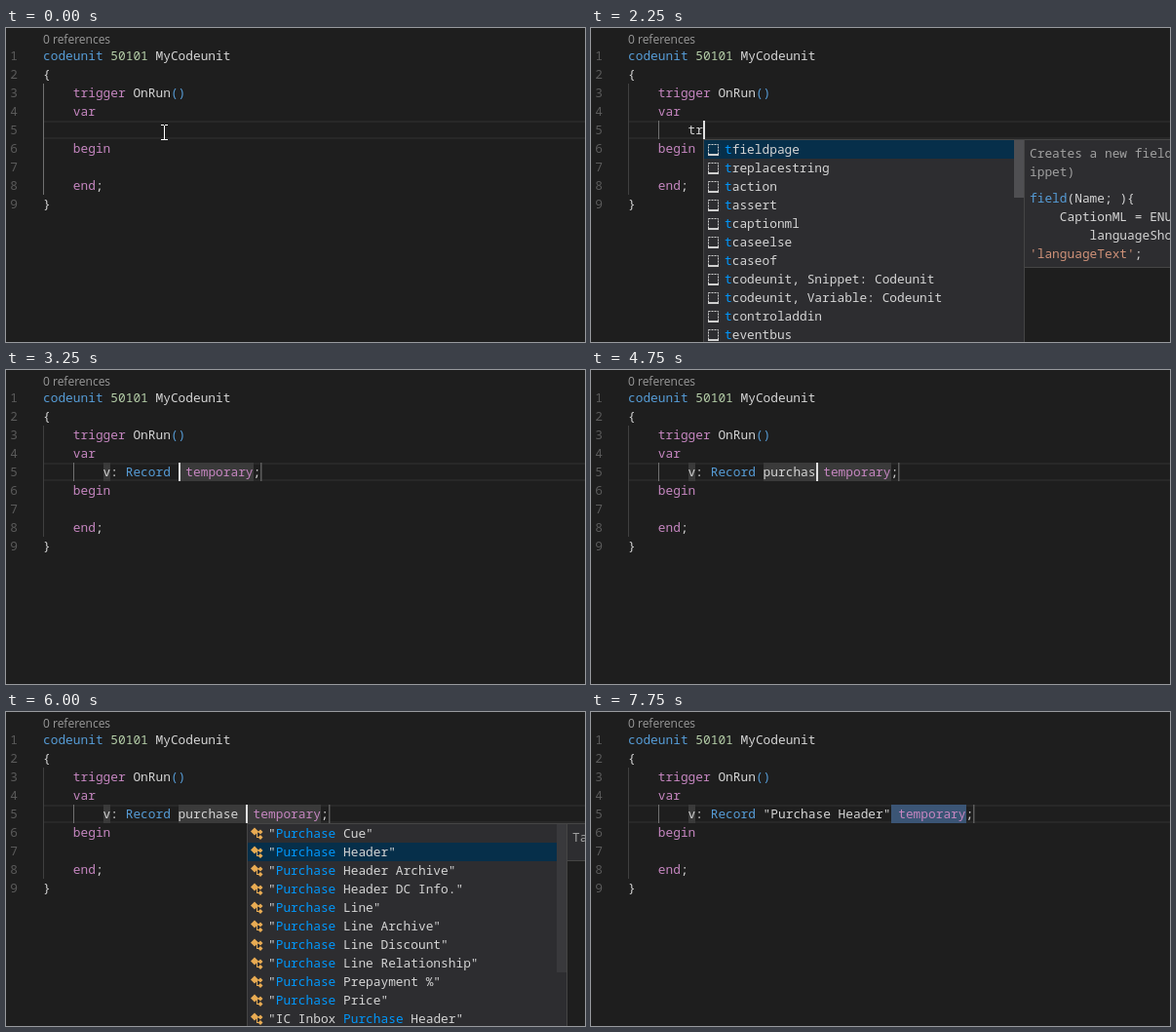
These frames come from a looping animation (594 by 322 pixels, 8000 ms). An HTML page with a canvas:

```html
<!DOCTYPE html>
<html lang="en">
<head>
<meta charset="utf-8">
<title>Record snippet</title>
<style>
html, body { margin: 0; width: 100%; height: 100%; overflow: hidden; background: #1e1e1e; }
canvas { display: block; width: 594px; height: 322px; }
</style>
</head>
<body>
<canvas id="stage"></canvas>
<script>
const W = 594, H = 322, LOOP = 8000;
const CW = 7.7, ROW = 19, LEFT = 38, EDIT_TOP = 95;
const MONO = '12.83px "Noto Sans Mono", monospace';
const SANS = '12px "Open Sans", sans-serif';
const C = {
  bg: '#1e1e1e', text: '#d4d4d4', blue: '#569cd6', pink: '#c586c0', num: '#b5cea8',
  string: '#ce9178', lineNo: '#5a5a5a', lens: '#999999', guide: '#404040', guideOn: '#707070',
  current: '#282828', slot: '#3a3a3a', stop: '#5c5c5c', select: '#3b5575', caret: '#e0e0e0',
  popup: '#2d2d30', border: '#454545', picked: '#062f4a', match: '#0097fb', note: '#a0a0a0',
  icon: '#d0d0d0', table: '#e8ab53'
};

const canvas = document.getElementById('stage');
const ctx = canvas.getContext('2d');
const dpr = window.devicePixelRatio || 1;
canvas.width = W * dpr;
canvas.height = H * dpr;

function rect(x, y, w, h, color) {
  ctx.fillStyle = color;
  ctx.fillRect(x, y, w, h);
}

function text(s, x, y, color = C.text, font = MONO) {
  ctx.font = font;
  ctx.fillStyle = color;
  ctx.fillText(s, x, y);
}

// Draws [string, color] pairs one after another on the character grid.
function runs(list, x, y) {
  for (const [s, color] of list) {
    text(s, x, y, color);
    x += s.length * CW;
  }
}

const col = n => LEFT + n * CW;

const CODE = [
  [0, ['codeunit', C.blue], [' 50101', C.num], [' MyCodeunit', C.text]],
  [0, ['{', C.text]],
  [4, ['trigger', C.pink], [' OnRun', C.text], ['()', C.blue]],
  [4, ['var', C.pink]],
  [0],
  [4, ['begin', C.pink]],
  [0],
  [4, ['end', C.pink], [';', C.text]],
  [0, ['}', C.text]]
];

const SNIPPETS = ['tfieldpage', 'treplacestring', 'taction', 'tassert', 'tcaptionml', 'tcaseelse',
  'tcaseof', 'tcodeunit, Snippet: Codeunit', 'tcodeunit, Variable: Codeunit',
  'tcontroladdin', 'teventbus'];
const RECORDS = ['trecord, Snippet: Record', 'trecord, Variable: Record', 'trecordtemp', 'trecordref',
  'trecordid', 'trecordlist'];
const TABLES = ['Purchase Cue', 'Purchase Header', 'Purchase Header Archive',
  'Purchase Header DC Info.', 'Purchase Line', 'Purchase Line Archive', 'Purchase Line Discount',
  'Purchase Line Relationship', 'Purchase Prepayment %', 'Purchase Price',
  'IC Inbox Purchase Header'].map(s => `"${s}"`);
const HEADERS = [...TABLES.slice(1, 4), TABLES[10], '"IC Outbox Purchase Header"'];

const FIELD_NOTE = {
  about: ['Creates a new field (Sn', 'ippet)'],
  code: [
    [['field', C.blue], ['(Name; ){', C.text]],
    [['    CaptionML = ENU', C.text]],
    [['        languageShort', C.text]],
    [["'languageText'", C.string], [';', C.text]]
  ]
};
const RECORD_NOTE = {
  about: ['Creates a new record (S', 'nippet)'],
  code: [[['v', C.text], [': ', C.text], ['Record', C.blue], [' temporary;', C.pink]]]
};
const TABLE_NOTE = { about: ['Table'], code: [] };

// Each step holds until the next one begins.
const STEPS = [
  { t: 0, mouse: [162, 107] },
  { t: 250, mouse: [163, 107] },
  { t: 500, mouse: [163, 107], caret: true },
  { t: 750, mouse: [168, 288], caret: true },
  { t: 1000 },
  { t: 1500, caret: true },
  { t: 2000, word: 't', caret: true },
  { t: 2250, word: 'tr', caret: true,
    list: { x: 115, items: SNIPPETS, match: 't', note: FIELD_NOTE, thumb: 59, bar: '#4f4f52' } },
  { t: 2500, word: 'trec', caret: true,
    list: { x: 115, items: RECORDS, match: 'trec', note: RECORD_NOTE } },
  { t: 3000, word: 'treco', caret: true,
    list: { x: 115, items: RECORDS, match: 'trec', note: RECORD_NOTE } },
  { t: 3250, name: '', caret: true },
  { t: 3750, name: '' },
  { t: 4000, name: 'p', caret: true },
  { t: 4250, name: 'pur', caret: true },
  { t: 4500, name: 'purch', caret: true },
  { t: 4750, name: 'purchas', caret: true },
  { t: 5000, name: 'purchase ', caret: true, list: tableList(0, '#4f4f52') },
  { t: 5500, name: 'purchase ', list: tableList(0, '#4f4f52') },
  { t: 5750, name: 'purchase ', list: tableList(0, '#39393c') },
  { t: 6000, name: 'purchase ', caret: true, list: tableList(1, '#39393c') },
  { t: 6250, name: 'purchase h', caret: true,
    list: { x: 247, items: HEADERS, match: 'Purchase H', note: TABLE_NOTE, table: true } },
  { t: 6750, name: '"Purchase Header"', done: true, caret: true },
  { t: 7250, name: '"Purchase Header"', done: true },
  { t: 7500, name: '"Purchase Header"', done: true, selected: true, caret: true },
  { t: 7750, name: '"Purchase Header"', done: true, selected: true }
];

function tableList(pick, bar) {
  return { x: 247, items: TABLES, match: 'Purchase', note: TABLE_NOTE, table: true,
    pick, thumb: 152, bar };
}

function drawEditor(indented) {
  rect(0, 0, W, H, C.bg);
  rect(LEFT, EDIT_TOP, W, 2, C.current);
  rect(LEFT, EDIT_TOP + 17, W, 2, C.current);
  rect(LEFT, 57, 1, 114, indented ? C.guide : C.guideOn);
  if (indented) rect(69, EDIT_TOP, 1, ROW, C.guideOn);
  text('0 references', LEFT, 16, C.lens, SANS);
  CODE.forEach(([indent, ...parts], i) => {
    const y = ROW * (i + 1) + 14;
    text(String(i + 1), 4.3, y, C.lineNo);
    runs(parts, col(indent), y);
  });
}

function drawCaret(x) {
  rect(Math.round(x), EDIT_TOP, 2, ROW, C.caret);
}

function drawEditLine(s) {
  const y = EDIT_TOP + 14, start = col(8);
  if (s.name === undefined) {
    const word = s.word || '';
    text(word, start, y);
    if (s.caret) drawCaret(start + word.length * CW);
    return;
  }
  const nameX = col(18), nameEnd = nameX + s.name.length * CW, end = nameEnd + 10 * CW;
  const slotX = s.done ? nameEnd : nameX;
  rect(Math.round(start), EDIT_TOP, 7, ROW, C.slot);
  rect(Math.round(slotX), EDIT_TOP, Math.round(end - slotX), ROW, s.selected ? C.select : C.slot);
  rect(Math.round(end + CW), EDIT_TOP, 1.5, ROW, C.stop);
  runs([['v: ', C.text], ['Record ', C.blue], [s.name, C.text],
    [' temporary', C.pink], [';', C.text]], start, y);
  if (s.caret) drawCaret(s.selected ? end : nameEnd);
}

function snippetIcon(x, y) {
  ctx.strokeStyle = C.icon;
  ctx.lineWidth = 1;
  ctx.setLineDash([2, 1]);
  ctx.strokeRect(x + 5.5, y + 4.5, 10, 10);
  ctx.setLineDash([]);
  rect(x + 5, y + 14, 11, 2, C.icon);
}

function diamond(x, y, r) {
  ctx.beginPath();
  ctx.moveTo(x - r, y);
  ctx.lineTo(x, y - r);
  ctx.lineTo(x + r, y);
  ctx.lineTo(x, y + r);
  ctx.fill();
}

function tableIcon(x, y) {
  ctx.fillStyle = C.table;
  diamond(x + 8, y + 7.5, 4);
  diamond(x + 14, y + 8, 2.5);
  diamond(x + 14, y + 13.5, 2.5);
  rect(x + 9, y + 7.5, 4, 1, C.table);
  rect(x + 10, y + 8, 1, 5.5, C.table);
  rect(x + 10, y + 13, 3, 1, C.table);
}

function panel(x, y, w, h) {
  rect(x, y, w, h, C.border);
  rect(x + 1, y + 1, w - 2, h - 2, C.popup);
}

function drawNote(x, y, note) {
  const aboutH = note.about.length * ROW;
  const codeH = note.code.length ? note.code.length * ROW + 8 : 10;
  panel(x, y, W - x + 10, aboutH + codeH + 10);
  note.about.forEach((s, i) => text(s, x + 6, y + 19 + i * ROW, C.note));
  note.code.forEach((line, i) => runs(line, x + 6, y + 27 + aboutH + i * ROW));
}

function drawList({ x, items, match, note, table, pick = 0, thumb, bar }) {
  const y = 114, w = table ? 329 : 330;
  const rows = thumb ? 12 : items.length;
  drawNote(x + w - 1, y, note);
  panel(x, y, w, rows * ROW + 2);
  items.forEach((s, i) => {
    const top = y + 1 + i * ROW, at = s.indexOf(match);
    if (i === pick) rect(x + 1, top, w - 2, ROW, C.picked);
    (table ? tableIcon : snippetIcon)(x, top);
    const cut = at < 0 ? 0 : at, stop = at < 0 ? 0 : at + match.length;
    runs([[s.slice(0, cut), C.text], [s.slice(cut, stop), C.match], [s.slice(stop), C.text]],
      x + 22, top + 14);
  });
  if (thumb) rect(x + w - 11, y + 1, 10, thumb, bar);
}

function drawMouse([x, y]) {
  rect(x, y - 7, 1, 15, '#ffffff');
  for (const end of [y - 8, y + 7]) {
    rect(x - 3, end, 3, 1, '#ffffff');
    rect(x + 1, end, 3, 1, '#ffffff');
  }
}

function draw(now) {
  const t = now % LOOP;
  const step = STEPS.findLast(s => s.t <= t);
  ctx.setTransform(dpr, 0, 0, dpr, 0, 0);
  drawEditor(step.word !== undefined || step.name !== undefined);
  drawEditLine(step);
  if (step.list) drawList(step.list);
  if (step.mouse) drawMouse(step.mouse);
}

let begin;
function tick(now) {
  begin ??= now;
  draw(Math.max(0, now - begin));
  requestAnimationFrame(tick);
}
draw(0);
requestAnimationFrame(tick);
</script>
</body>
</html>
```
